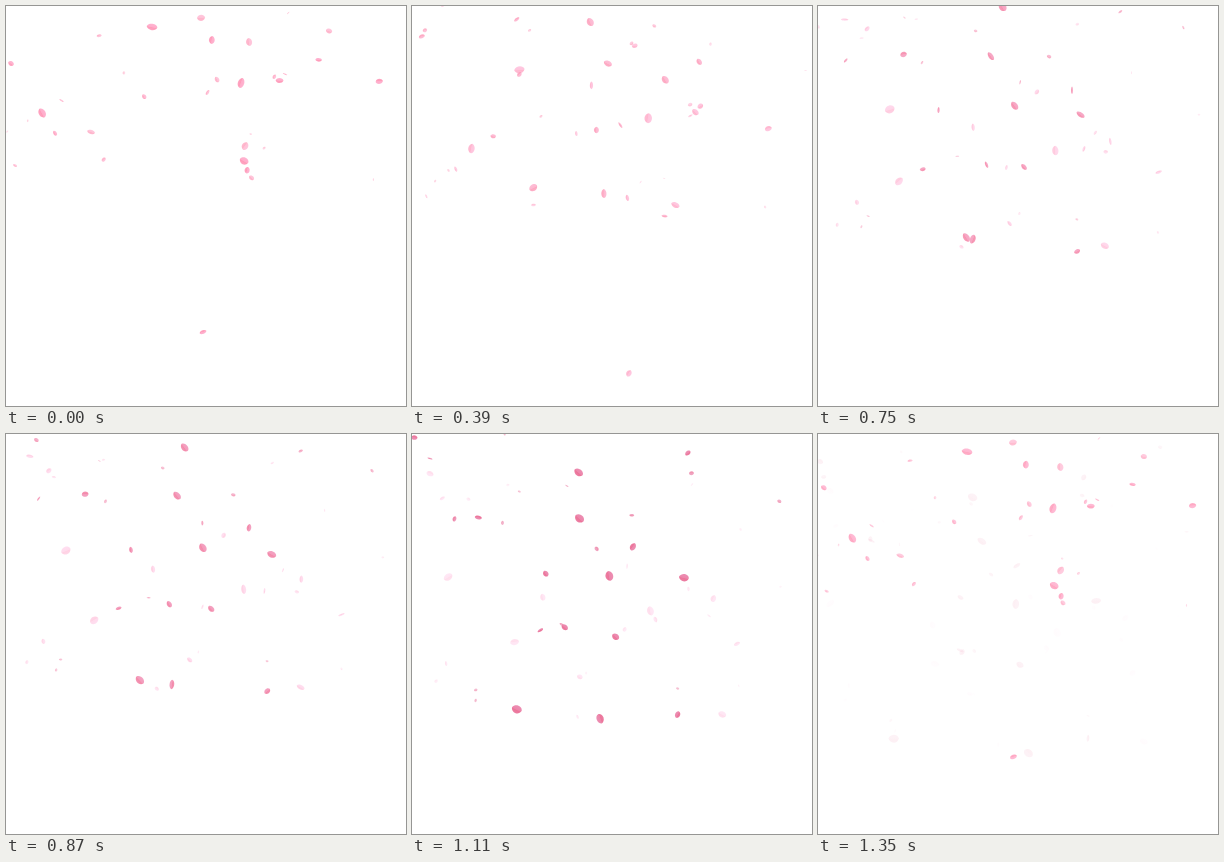
Recreate the animation shown at these times as an HTML page with a canvas. Size 400 px wide and 400 px high, loop 1.38 s.

```html
<!DOCTYPE html>
<html lang="en">
<head>
<meta charset="utf-8">
<title>Falling petals</title>
<style>
  html, body { margin: 0; width: 100%; height: 100%; overflow: hidden; background: #fff; }
  canvas { display: block; width: 100vw; height: 100vh; }
</style>
</head>
<body>
<canvas width="400" height="400"></canvas>
<script>
const ctx = document.querySelector('canvas').getContext('2d');
const LOOP = 1380, STEP = 30, BLEND = 270;
const LIFE = 1.11; // seconds over which a petal deepens or fades

let seed = 29;
const rand = (lo = 0, hi = 1) => {
  seed = (seed * 16807) % 2147483647;
  return lo + (hi - lo) * seed / 2147483647;
};
const mix = (a, b, k) => a + (b - a) * k;

const petals = [];

// u and v are the drift in px per second
function addPetal(x, y, u, v, fades, r) {
  petals.push({
    x, y, u, v, fades, r,
    angle: rand(0, Math.PI), turn: rand(-2, 2),
    phase: rand(0, Math.PI), flip: rand(2, 6)
  });
}

// the large petals that lead the eye
addPetal(195, 12, 2, 117, false, 5);
addPetal(184, -21, -15, 95, false, 5);
addPetal(239, 140, -121, 122, false, 5.2);
addPetal(85, 126, 93, 143, false, 5);
addPetal(243, 36, 26, 97, false, 5);
addPetal(323, 25, -92, 79, false, 4);
addPetal(222, -77, -50, 104, false, 5);
addPetal(146, 21, -99, 110, true, 5.4);
addPetal(235, 77, 3, 90, true, 5.2);
addPetal(36, 107, 60, 91, true, 5);
addPetal(238, 155, 65, 113, true, 4.6);
addPetal(197, 326, 51, 106, true, 3.6);

// a drift of smaller ones, mostly tiny and denser on the left
for (let i = 0; i < 52; i++) {
  addPetal(430 * rand() ** 1.2 - 10, rand(-115, 175), rand(-80, 80),
    rand(70, 130), i % 2 === 0, 1.5 + 2.6 * rand() ** 1.5);
}

function tone(p, k, light) {
  const [r, g, b] = p.fades
    ? [255, mix(158, 180, k), mix(189, 214, k)]
    : [mix(255, 236, k * k), mix(168, 124, k * k), mix(195, 161, k * k)];
  return `rgb(${r},${g + light},${b + light})`;
}

function drawPetal(p, s, alpha) {
  const x = p.x + p.u * s, y = p.y + p.v * s;
  if (x < -10 || x > 410 || y < -10 || y > 410) return;
  const k = Math.min(1, Math.max(0, s / LIFE));
  const size = p.r * (p.fades ? mix(1, .9, k) : mix(.8, 1, k));
  const open = Math.abs(Math.cos(p.phase + p.flip * s));
  const w = size * mix(p.r > 4.4 ? .5 : .25, .8, open);

  ctx.save();
  ctx.globalAlpha = alpha * (p.fades ? mix(.95, .4, k) : mix(.8, 1, k)) * Math.min(1, p.r / 3.2);
  ctx.translate(x, y);
  ctx.rotate(p.angle + p.turn * s);
  const shade = ctx.createLinearGradient(0, -w, 0, w);
  shade.addColorStop(0, tone(p, k, 18));
  shade.addColorStop(.5, tone(p, k, 10));
  shade.addColorStop(.6, tone(p, k, -8));
  shade.addColorStop(1, tone(p, k, 4));
  ctx.fillStyle = shade;
  ctx.beginPath();
  ctx.moveTo(-size, 0);
  ctx.bezierCurveTo(-size * .7, -w * 1.3, size * .8, -w * 1.3, size, -w * .15);
  ctx.bezierCurveTo(size * .8, w * 1.3, -size * .7, w * 1.3, -size, 0);
  ctx.fill();
  ctx.restore();
}

function render(now) {
  const t = Math.floor((now % LOOP) / STEP) * STEP;
  // the end of the loop dissolves into its beginning
  const blend = Math.max(0, (t - LOOP + BLEND) / BLEND);
  ctx.fillStyle = '#fff';
  ctx.fillRect(0, 0, 400, 400);
  for (const p of petals) {
    drawPetal(p, t / 1000, 1 - blend);
    if (blend > 0) drawPetal(p, (t - LOOP) / 1000, blend);
  }
}

const start = performance.now();
function tick() {
  render(performance.now() - start);
  requestAnimationFrame(tick);
}
tick();
</script>
</body>
</html>
```
